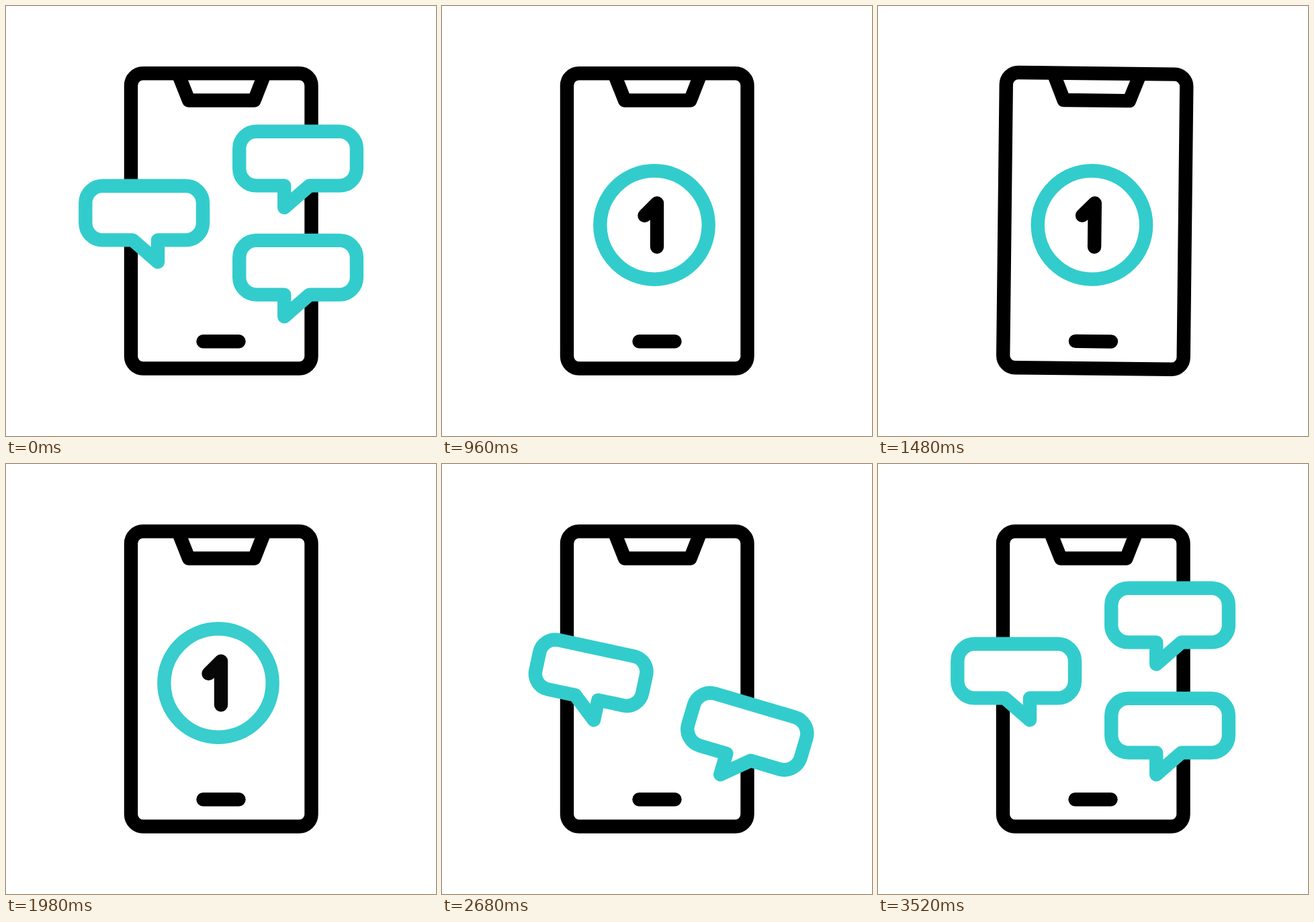
An HTML page for the animation above (3600 ms loop, 640x640 px).

```html
<!DOCTYPE html>
<html lang="en">
<head>
<meta charset="utf-8">
<title>Phone messages</title>
<style>
html, body { margin: 0; width: 100%; height: 100%; overflow: hidden; background: #fff; }
svg { display: block; width: 100vw; height: 100vh; }
svg * { stroke-width: 20.4; stroke-linecap: round; stroke-linejoin: round; }
.ink { fill: none; stroke: #000; }
.teal { fill: #fff; stroke: #3cc; }
</style>
</head>
<body>
<svg viewBox="0 0 640 640">
  <g id="phone">
    <rect class="ink" x="186" y="100.3" width="268.5" height="439.2" rx="18"/>
    <path class="ink" d="M256.3 101L272 140.5H369.5L385 101"/>
    <path class="ink" d="M293.5 499.2H346.5"/>
    <g id="badge">
      <circle class="teal" cx="316" cy="326" r="80.7"/>
      <path class="ink" d="M301.5 312L320 293.5V358.5"/>
    </g>
  </g>
  <path class="teal" id="low"/>
  <path class="teal" id="left"/>
  <path class="teal" id="top"/>
</svg>
<script>
const LOOP = 3600;
const el = id => document.getElementById(id);

// Eased value through [time, value] keys
function track(t, keys) {
  if (t <= keys[0][0]) return keys[0][1];
  for (let i = 1; i < keys.length; i++) {
    const [t0, a] = keys[i - 1], [t1, b] = keys[i];
    if (t < t1) {
      const p = (t - t0) / (t1 - t0);
      return a + (b - a) * p * p * (3 - 2 * p);
    }
  }
  return keys[keys.length - 1][1];
}

// Speech bubble around its tail tip; the line keeps its width at any scale
function bubblePath(scale, side) {
  const n = v => (v * scale).toFixed(2);
  const x = v => n(v * side);
  const r = 25.5, l = -67, w = 107.7, t = -113.3, b = -32.6;
  const corner = (cx, cy, px, py) => `Q${x(cx)} ${n(cy)} ${x(px)} ${n(py)}`;
  const arc = (px, py) => `A${n(r)} ${n(r)} 0 0 ${side > 0 ? 1 : 0} ${x(px)} ${n(py)}`;
  return `M0 0L${x(37.5)} ${n(b)}L${x(w - r)} ${n(b)}` +
    `A${n(r)} ${n(r)} 0 0 ${side > 0 ? 0 : 1} ${x(w)} ${n(b - r)}` +
    `L${x(w)} ${n(t + r)}A${n(r)} ${n(r)} 0 0 ${side > 0 ? 0 : 1} ${x(w - r)} ${n(t)}` +
    `L${x(l + r)} ${n(t)}A${n(r)} ${n(r)} 0 0 ${side > 0 ? 0 : 1} ${x(l)} ${n(t + r)}` +
    `L${x(l)} ${n(b - r)}A${n(r)} ${n(r)} 0 0 ${side > 0 ? 0 : 1} ${x(l + r)} ${n(b)}` +
    `L0 ${n(b)}Z`;
}

const bubbles = [
  { id: "low", x: 414.2, y: 462.2, side: 1, out: 303, enter: 2190, swing: 16.4 },
  { id: "left", x: 226, y: 381, side: -1, out: 150, enter: 2480, swing: 18.8 },
  { id: "top", x: 414.2, y: 300, side: 1, out: 0, enter: 2785, swing: 16.8, lift: 2 }
];

function drawBubble(b, t) {
  const node = el(b.id), e = b.enter, back = t >= e;
  const scale = back
    ? track(t, [[e, 0], [e + 240, 1]])
    : track(t, [[b.out, 1], [b.out + 205, 0]]);
  const turn = track(t, [[e, 0], [e + 240, -13], [e + 490, b.swing], [e + 735, 0]]) * b.side;
  const y = b.y - (back && b.lift || 0);
  node.style.display = scale > 0.002 ? "" : "none";
  node.setAttribute("d", bubblePath(Math.max(scale, 0.002), b.side));
  node.setAttribute("transform", `translate(${b.x} ${y}) rotate(${turn.toFixed(3)})`);
}

function draw(t) {
  bubbles.forEach(b => drawBubble(b, t));
  const tilt = track(t, [[957, 0], [1157, -2], [1357, 2], [1557, 0]]);
  el("phone").setAttribute("transform", `rotate(${tilt.toFixed(3)} 320 540)`);
  el("badge").setAttribute("opacity", track(t, [[550, 0], [750, 1], [1960, 1], [2155, 0]]));
}

function frame() {
  draw(performance.now() % LOOP);
  requestAnimationFrame(frame);
}
frame();
</script>
</body>
</html>
```
